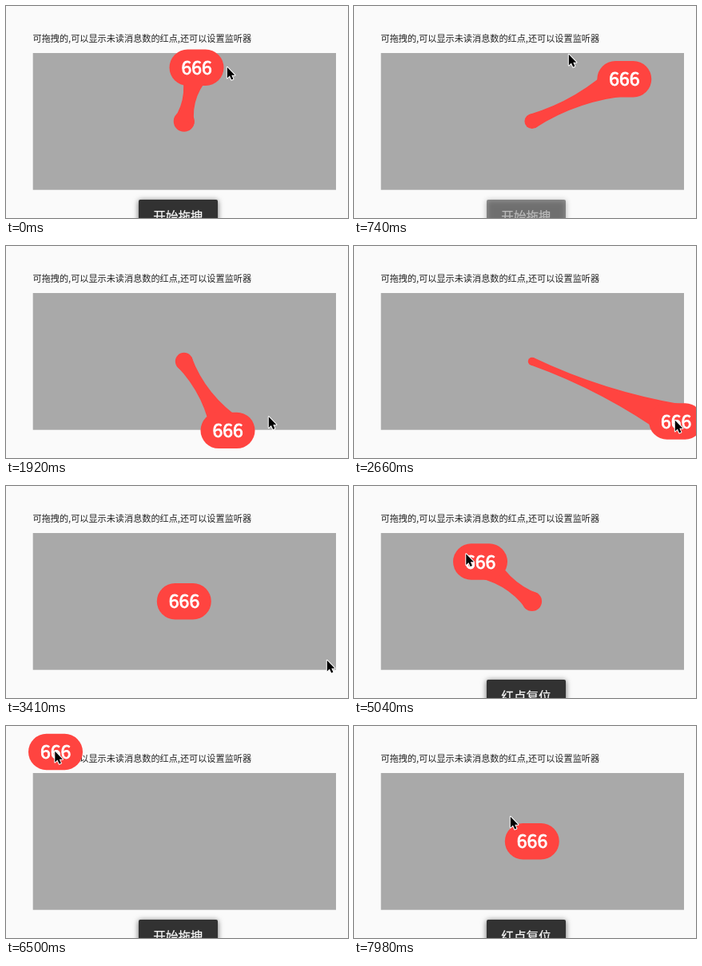
Write an HTML page with a canvas that moves like this. It is 428 px wide and 266 px high and loops after 8000 ms.

```html
<!DOCTYPE html>
<html lang="zh">
<head>
<meta charset="utf-8">
<title>Draggable badge</title>
<style>
html, body { margin: 0; width: 100%; height: 100%; overflow: hidden; background: #fafafa; }
canvas { display: block; width: 428px; height: 266px; }
</style>
</head>
<body>
<canvas id="stage"></canvas>
<script>
const W = 428, H = 266, LOOP = 8000, STEP = 147.78;
const RED = '#ff4440';
const FONT = '"Noto Sans CJK SC", "Noto Sans CJK", "Noto Sans", sans-serif';
const HOME = { x: 222.8, y: 144.7 };
const START = '开始拖拽', RESET = '红点复位';

// Steps at which the pointer grabs, releases or tears off the badge
const RELEASE = 20, LEAVE_REST = 24, GRAB = 30, SNAP = 38, RELEASE_TORN = 46, HOME_AGAIN = 49, LEAVE = 50, LAST = 54;

const key = (step, x, y) => ({ step, x, y });
const swing = [
  key(0, 238.5, 77.3), key(1, 278, 78), key(4, 378, 120), key(6, 270, 62), key(8, 143, 96),
  key(9, 119, 140), key(10, 128, 199), key(12, 225, 239), key(15, 370, 205), key(18, 403, 220)
];
const tear = [
  key(GRAB, 226, 146), key(34, 158, 95), key(35, 141, 86), key(39, 35, 22), key(42, 37, 27), key(44, 62, 32.5)
];

const toasts = [
  { from: -9, to: 6, text: START },
  { from: 24, to: 40, text: RESET },
  { from: 39, to: 52, text: START },
  { from: 52, to: 70, text: RESET }
];

const canvas = document.getElementById('stage');
const ctx = canvas.getContext('2d');
const ratio = window.devicePixelRatio || 1;
canvas.width = W * ratio;
canvas.height = H * ratio;

const clamp = v => Math.max(0, Math.min(1, v));
const smooth = v => { const k = clamp(v); return k * k * (3 - 2 * k); };
const mix = (a, b, k) => ({ x: a.x + (b.x - a.x) * k, y: a.y + (b.y - a.y) * k });
const shift = (p, d) => ({ x: p.x + d, y: p.y + d });

function overshoot(v) {
  const u = clamp(v) - 1;
  return u * u * (5 * u + 4) + 1;
}

// Smooth curve through timed points
function along(path, step) {
  const last = path.length - 1;
  if (step >= path[last].step) return path[last];
  const n = path.findIndex(p => p.step > step) - 1;
  const a = path[n], b = path[n + 1], span = b.step - a.step;
  const k = (step - a.step) / span;
  const slope = (i, axis) => {
    const p = path[Math.max(0, i - 1)], q = path[Math.min(last, i + 1)];
    return (q[axis] - p[axis]) / (q.step - p.step) * span;
  };
  const value = axis =>
    a[axis] + (b[axis] - a[axis]) * smooth(k) +
    k * (1 - k) * ((1 - k) * slope(n, axis) - k * slope(n + 1, axis));
  return { x: value('x'), y: value('y') };
}

function badgeAt(step) {
  if (step < RELEASE) return along(swing, step);
  if (step < GRAB) return mix(swing.at(-1), HOME, overshoot((step * STEP - 2867) / 500));
  if (step <= RELEASE_TORN) return along(tear, step);
  const rest = 1 - clamp((step - RELEASE_TORN) / (HOME_AGAIN - RELEASE_TORN));
  return mix(HOME, tear.at(-1), rest * rest);
}

// While dragging, the pointer runs one step ahead of the badge
function cursorAt(step) {
  const rest = shift(swing.at(-1), -2), torn = shift(tear.at(-1), -1.5);
  if (step < LEAVE_REST) return shift(along(swing, step + 1), -2);
  if (step < GRAB) return mix(rest, tear[0], smooth((step - LEAVE_REST) / (GRAB - LEAVE_REST)));
  if (step < LEAVE) return shift(along(tear, step + 1), -1.5);
  return mix(torn, { x: 195, y: 113 }, smooth((step - LEAVE) / (LAST - LEAVE)));
}

function roundRect(x, y, w, h, r) {
  ctx.beginPath();
  ctx.roundRect(x, y, w, h, r);
  ctx.fill();
}

function write(text, x, y, size, color, align = 'left', weight = 0) {
  ctx.font = `${size}px ${FONT}`;
  ctx.fillStyle = ctx.strokeStyle = color;
  ctx.textAlign = align;
  ctx.fillText(text, x, y);
  if (!weight) return;
  ctx.lineWidth = weight;
  ctx.lineJoin = 'round';
  ctx.strokeText(text, x, y);
}

function drawTether(badge) {
  const dx = badge.x - HOME.x, dy = badge.y - HOME.y, d = Math.hypot(dx, dy);
  if (d < 2) return;
  const r = 17.5 - .064 * d, R = 22.7;
  const nx = -dy / d, ny = dx / d;
  const mid = mix(HOME, badge, .5);
  ctx.fillStyle = RED;
  ctx.beginPath();
  ctx.arc(HOME.x, HOME.y, r, 0, Math.PI * 2);
  ctx.fill();
  ctx.beginPath();
  ctx.moveTo(HOME.x + nx * r, HOME.y + ny * r);
  ctx.quadraticCurveTo(mid.x, mid.y, badge.x + nx * R, badge.y + ny * R);
  ctx.lineTo(badge.x - nx * R, badge.y - ny * R);
  ctx.quadraticCurveTo(mid.x, mid.y, HOME.x - nx * r, HOME.y - ny * r);
  ctx.fill();
}

function drawBadge({ x, y }) {
  ctx.fillStyle = RED;
  roundRect(x - 34, y - 22.7, 68, 45.4, 22.7);
  write('666', x + .2, y + 8.6, 23, '#fff', 'center', .9);
}

function drawToast({ from, to, text }, step) {
  const alpha = clamp(Math.min(step - from, to - step) / 2);
  if (!alpha) return;
  ctx.save();
  ctx.globalAlpha = alpha;
  ctx.save();
  ctx.shadowColor = 'rgba(0,0,0,.6)';
  ctx.shadowBlur = 7 * ratio;
  ctx.shadowOffsetY = ratio;
  ctx.fillStyle = '#323232';
  roundRect(166, 243, 99, 40, 2);
  ctx.restore();
  write(text, 215.5, 269.5, 15.6, '#f8f8f8', 'center', .25);
  ctx.restore();
}

const arrow = new Path2D('M0 0V13.6L3.1 10.8L5.4 15.8L7.6 14.8L5.5 10H9.6Z');

function drawCursor({ x, y }) {
  ctx.save();
  ctx.translate(x + .8, y + .8);
  ctx.strokeStyle = '#fff';
  ctx.lineWidth = 2;
  ctx.stroke(arrow);
  ctx.fillStyle = '#000';
  ctx.fill(arrow);
  ctx.restore();
}

function draw(time) {
  const step = Math.min(LAST, Math.floor((time + 8) / STEP));
  const badge = badgeAt(step);
  ctx.setTransform(ratio, 0, 0, ratio, 0, 0);
  ctx.fillStyle = '#fafafa';
  ctx.fillRect(0, 0, W, H);
  ctx.fillStyle = '#a9a9a9';
  ctx.fillRect(33.7, 59, 379.3, 171.7);
  write('可拖拽的,可以显示未读消息数的红点,还可以设置监听器', 33.5, 45.2, 11.15, '#222');
  if (step < SNAP) drawTether(badge);
  drawBadge(badge);
  toasts.forEach(toast => drawToast(toast, step));
  drawCursor(cursorAt(step));
}

const began = performance.now();
function tick() {
  draw((performance.now() - began) % LOOP);
  requestAnimationFrame(tick);
}
tick();
</script>
</body>
</html>
```
